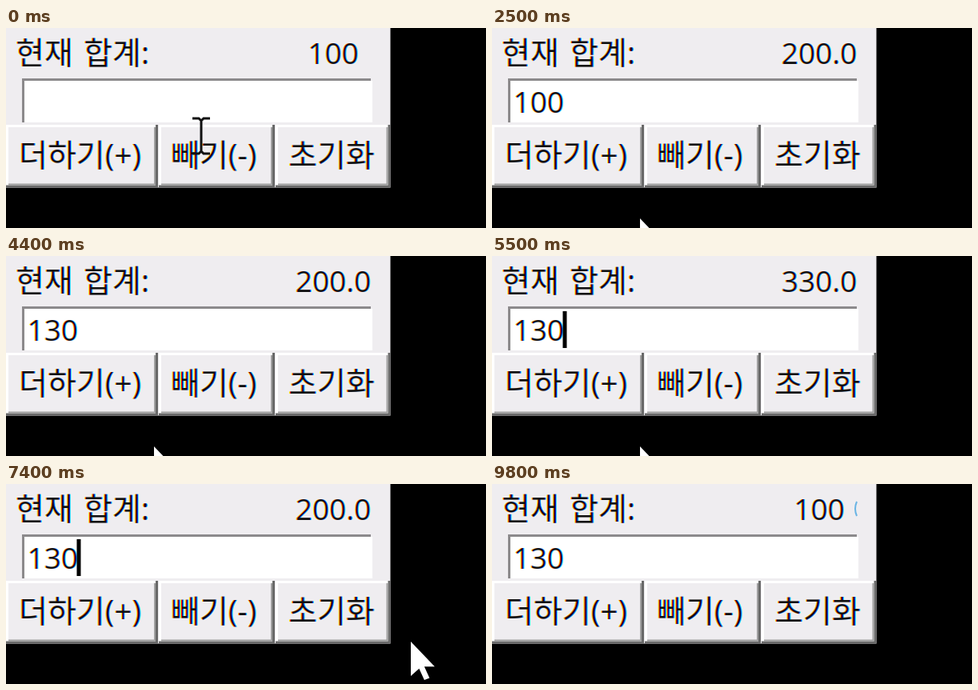
Animation of 600 by 250 pixels, one loop 9900 ms. Source, as an HTML page with a canvas:

```html
<!DOCTYPE html>
<html lang="ko">
<head>
<meta charset="utf-8">
<style>
  html, body { margin: 0; height: 100%; overflow: hidden; background: #000; }
  canvas { display: block; }
</style>
</head>
<body>
<canvas id="stage" width="600" height="250"></canvas>
<script>
const ctx = document.getElementById('stage').getContext('2d');
const LOOP = 9900, STEP = 100;
const FACE = '#efedf0', INK = '#111';
const FAMILY = '"Open Sans", "Noto Sans CJK KR", sans-serif';
const LABEL_SIZE = 39, DIGIT_SIZE = 37;

// [time, value]: each value holds until the next one
const entryText = [[0, ''], [300, '1'], [500, '10'], [800, '100'],
  [3000, '10'], [3200, '1'], [3600, '13'], [3900, '130']];
const totalText = [[0, '100'], [2200, '200.0'], [5300, '330.0'], [6600, '200.0'], [7700, '100']];

// [time, x, y] of the pointer
const pointerPath = [[0, 244, 135], [1500, 244, 135], [1900, 185, 238], [5800, 185, 238],
  [6300, 313, 208], [6900, 313, 208], [7300, 506, 197], [7900, 506, 197],
  [8200, 274, 124], [8500, 279, 145], [9700, 279, 145]];

const buttons = [
  { x: 0, w: 190, label: '더하기(+)', textX: 16, presses: [2000, 5100] },
  { x: 191, w: 145, label: '빼기(-)', textX: 206, presses: [6400] },
  { x: 337, w: 143.5, label: '초기화', textX: 353, presses: [7500] },
];

const valueAt = (steps, t) => steps.filter(([start]) => start <= t).pop()[1];

function pointerAt(t) {
  const next = pointerPath.findIndex(([time]) => time > t);
  if (next < 0) return null;
  const [t0, x0, y0] = pointerPath[next - 1];
  const [t1, x1, y1] = pointerPath[next];
  const p = (t - t0) / (t1 - t0), ease = p * p * (3 - 2 * p);
  return [x0 + (x1 - x0) * ease, y0 + (y1 - y0) * ease];
}

function rect(color, x, y, w, h) {
  ctx.fillStyle = color;
  ctx.fillRect(x, y, w, h);
}

// Each colour channel is inked a little apart, like subpixel antialiasing
function text(str, x, y, size, align = 'left') {
  ctx.font = `${size}px ${FAMILY}`;
  ctx.textAlign = align;
  ctx.globalCompositeOperation = 'multiply';
  ['#ff1', '#f1f', '#1ff'].forEach((color, i) => {
    ctx.fillStyle = color;
    ctx.fillText(str, x + (i - 1) * 0.9, y);
  });
  ctx.globalCompositeOperation = 'source-over';
  return ctx.measureText(str).width;
}

function drawButton({ x, w, label, textX, presses }, t) {
  const y = 121, h = 78.5;
  const down = presses.some(p => t >= p && t < p + 200);
  rect(down ? '#fff' : '#696969', x, y, w, h);
  rect(down ? '#696969' : '#fff', x, y, w - 3, h - 3);
  rect(down ? FACE : '#a0a0a0', x + 3, y + 3, w - 6, h - 6);
  rect(FACE, x + 3, y + 3, w - 8, h - 8);
  const shift = down ? 3 : 0;
  text(label, textX + shift, 173 + shift, LABEL_SIZE);
}

function drawBeam(x, y) {
  ctx.strokeStyle = INK;
  ctx.lineWidth = 3;
  ctx.beginPath();
  for (const s of [-1, 1]) {
    ctx.moveTo(x - 11, y + s * 22);
    ctx.lineTo(x - 3, y + s * 22);
    ctx.lineTo(x, y + s * 19);
    ctx.lineTo(x + 3, y + s * 22);
    ctx.lineTo(x + 11, y + s * 22);
  }
  ctx.moveTo(x, y - 19);
  ctx.lineTo(x, y + 19);
  ctx.stroke();
}

function drawArrow(x, y) {
  const shape = [[0, 0], [0, 16.5], [4, 13], [6.5, 18.5], [9, 17.5], [6.5, 12], [11.5, 12]];
  ctx.beginPath();
  for (const [px, py] of shape) ctx.lineTo(x + px * 2.6, y + py * 2.6);
  ctx.closePath();
  ctx.lineWidth = 3;
  ctx.strokeStyle = '#000';
  ctx.stroke();
  ctx.fillStyle = '#fff';
  ctx.fill();
}

function draw(t) {
  rect('#000', 0, 0, 600, 250);
  rect(FACE, 0, 0, 480.5, 199.5);

  text('현재', 12, 45, LABEL_SIZE);
  text('합계:', 97, 45, LABEL_SIZE);
  text(valueAt(totalText, t), 409, 44.5, DIGIT_SIZE, 'center');
  if (t >= 7700) {
    // sliver left behind by the wider number
    ctx.strokeStyle = '#69b4e4';
    ctx.lineWidth = 2;
    ctx.beginPath();
    ctx.moveTo(456, 22);
    ctx.quadraticCurveTo(452, 31, 456, 40);
    ctx.stroke();
  }

  rect('#8c8a8c', 20, 63, 436, 55);
  rect('#fff', 23, 66, 435, 52);
  const width = text(valueAt(entryText, t), 26.5, 105.5, DIGIT_SIZE);
  if ((t + 800) % 900 < 600) rect('#000', 25 + width, 69, 5, 46);

  for (const button of buttons) drawButton(button, t);

  const pointer = pointerAt(t);
  if (pointer) (pointer[1] > 175 ? drawArrow : drawBeam)(...pointer);
}

function tick() {
  const t = performance.now() % LOOP;
  draw(Math.floor(t / STEP) * STEP);
  requestAnimationFrame(tick);
}
tick();
</script>
</body>
</html>
```
